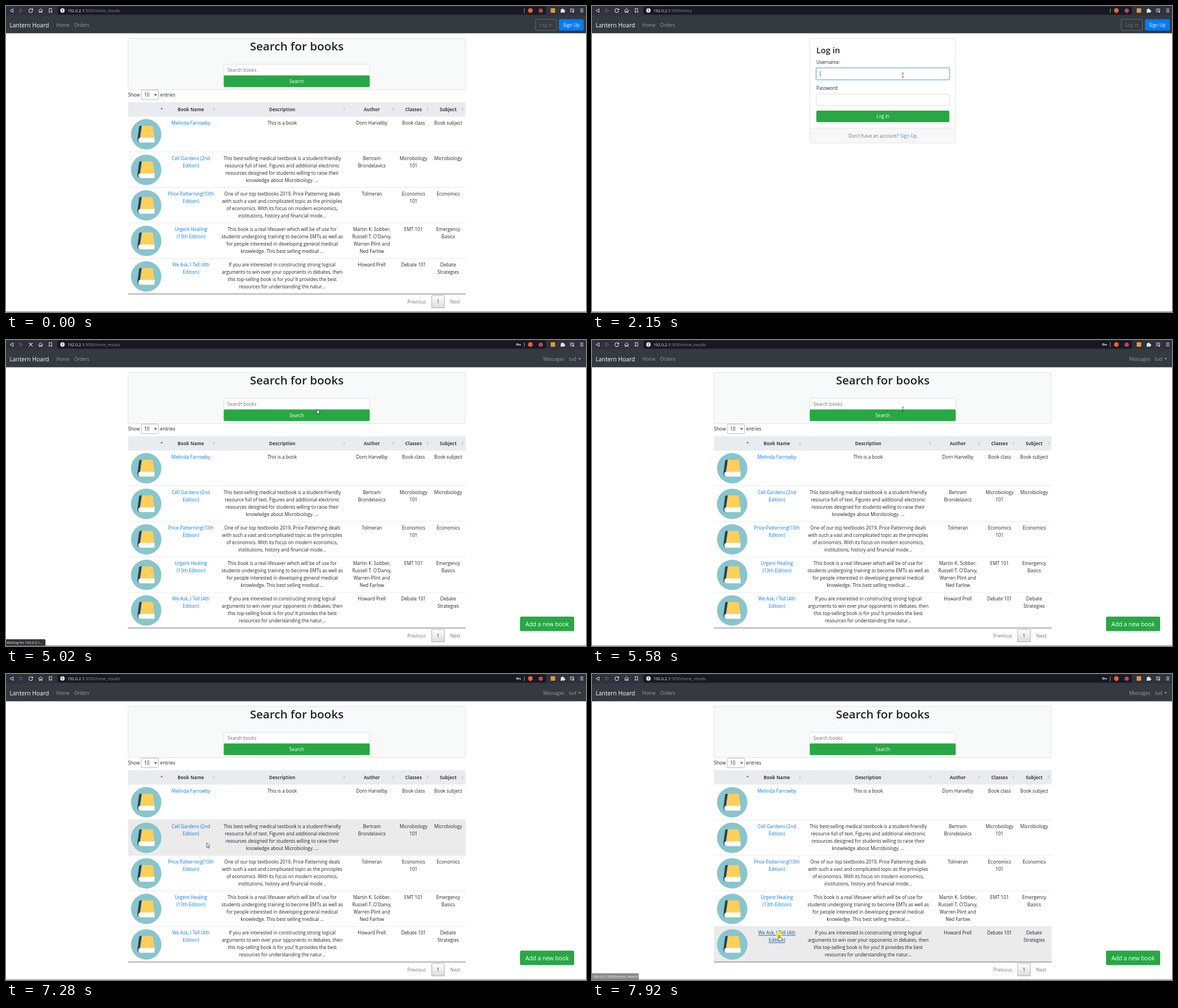
These frames come from a looping animation (1029 px wide and 544 px high, 8000 ms). An HTML page:

```html
<!DOCTYPE html>
<html lang="en">
<head>
<meta charset="utf-8">
<title>Book search</title>
<style>
html, body { margin: 0; width: 100%; height: 100%; overflow: hidden; background: #fff; }
svg { display: block; width: 100vw; height: 100vh; font-family: "Open Sans", "Noto Sans", sans-serif; }
.row .bg { fill: none; }
.row.hot .bg { fill: #ebebeb; }
.row.link .name { fill: #0056b3; text-decoration: underline; }
</style>
</head>
<body>
<svg id="stage" viewBox="0 0 1029 544" preserveAspectRatio="none"></svg>
<script>
const INK = '#212529', GRAY = '#6c757d', BLUE = '#007bff', GREEN = '#28a745', LINE = '#dee2e6';
const HOST = '192.0.2.1', PORT = ':5050';
const LOOP = 8000;
const ROW_TOP = 196, ROW_H = 63.2;

const text = (x, y, s, fill = INK, size = 8.25, anchor = 'middle', more = '') =>
  `<text x="${x}" y="${y}" fill="${fill}" font-size="${size}" text-anchor="${anchor}" ${more}>${s}</text>`;
const left = (x, y, s, fill, size, more) => text(x, y, s, fill, size, 'start', more);
const box = (x, y, w, h, fill, stroke = 'none', r = 2, more = '') =>
  `<rect x="${x}" y="${y}" width="${w}" height="${h}" rx="${r}" fill="${fill}" stroke="${stroke}" ${more}/>`;
const path = (d, fill = 'none', stroke = 'none', w = 1, more = '') =>
  `<path d="${d}" fill="${fill}" stroke="${stroke}" stroke-width="${w}" ${more}/>`;
const group = (id, body) => `<g id="${id}">${body}</g>`;

const books = [
  { name: ['Melinda Farrowby'], about: ['This is a book'],
    author: ['Dorn Harvelby'], level: ['Book class'], subject: ['Book subject'] },
  { name: ['Cell Gardens (2nd', 'Edition)'],
    about: ['This best-selling medical textbook is a student-friendly', 'resource full of text. Figures and additional electronic',
      'resources designed for students willing to raise their', 'knowledge about Microbiology. ...'],
    author: ['Bertram', 'Brondelavics'], level: ['Microbiology', '101'], subject: ['Microbiology'] },
  { name: ['Price Patterning(10th', 'Edition)'],
    about: ['One of our top textbooks 2019, Price Patterning deals', 'with such a vast and complicated topic as the principles',
      'of economics. With its focus on modern economics,', 'institutions, history and financial mode...'],
    author: ['Tolmeran'], level: ['Economics', '101'], subject: ['Economics'] },
  { name: ['Urgent Healing', '(13th Edition)'],
    about: ['This book is a real lifesaver which will be of use for', 'students undergoing training to become EMTs as well as',
      'for people interested in developing general medical', 'knowledge. This best selling medical ...'],
    author: ['Martin K. Sobber,', "Russell T. O'Darvy,", 'Warren Plint and', 'Ned Farlow'],
    level: ['EMT 101'], subject: ['Emergency', 'Basics'] },
  { name: ['We Ask, I Tell (4th', 'Edition)'],
    about: ['If you are interested in constructing strong logical', 'arguments to win over your opponents in debates, then',
      'this top-selling book is for you! It provides the best', 'resources for understanding the natur...'],
    author: ['Howard Prell'], level: ['Debate 101'], subject: ['Debate', 'Strategies'] }
];
const columns = [['name', 'Book Name', 328], ['about', 'Description', 490], ['author', 'Author', 649],
  ['level', 'Classes', 723], ['subject', 'Subject', 784.5]];

const bookIcon = y => `<g transform="translate(248.7 ${y})"><circle r="27" fill="#88c5cd"/>` +
  path('M-7-15H-10Q-12.3-15-12.6-13L-15.5 9Q-15.8 14.5-11 14.5L-7 7Z', '#2b4056') +
  path('M-7.8-15H10Q11.5-15 12-13L14.8 7H-11Z', '#fecf5b') +
  path('M14.8 6.3H-10.5Q-14 6.8-14 10.6T-10.5 14.8H14.8Z', '#fff') + '</g>';

const row = (b, i) => {
  const y = ROW_TOP + i * ROW_H;
  const cells = columns.map(([key, , x]) => b[key].map((s, n) => key === 'name'
    ? text(x, y + 14.6 + n * 13, s, BLUE, 8.25, 'middle', 'class="name"')
    : text(x, y + 14.6 + n * 13, s)).join('')).join('');
  return '<g class="row">' + box(216.5, y, 599, ROW_H, 'none', 'none', 0, 'class="bg"') +
    path(`M216.5 ${y}H815.5`, 'none', LINE, .7) + bookIcon(y + 32) + cells + '</g>';
};

const sorter = x => path(`M${x - 2} 182.8l2-2.6 2 2.6zM${x - 2} 184.2l2 2.6 2-2.6z`, '#c8cbd0');

const listing = box(216.5, 57.5, 598.5, 91, '#f8f9f9', '#dcdddd', 2, 'stroke-width=".8"') +
  text(515.8, 79.3, 'Search for books', INK, 20.6, 'middle', 'font-weight="600"') +
  box(386.5, 103.5, 258.5, 20.5, '#fff', '#ced4da', 2, 'stroke-width=".7"') + left(393, 117, 'Search books', GRAY) +
  box(386.3, 123.6, 259, 20.4, GREEN) + text(515.8, 137, 'Search', '#fff') +
  left(216.5, 161.3, 'Show') + box(240, 149.5, 30.5, 17, '#fff', '#aaa', 2, 'stroke-width=".8"') +
  left(245, 161.3, '10') + path('M263.2 156.7l2.1 2.2 2.1-2.2', 'none', INK, 1.1) + left(273.5, 161.3, 'entries') +
  box(216.5, 171, 599, 25, '#e9ecef', 'none', 0) +
  columns.map(c => text(c[2], 187, c[1], '#3b4148', 8.1, 'middle', 'font-weight="700"')).join('') +
  path('M273.8 183.6l2.3-3.2 2.3 3.2z', '#6a6fd0') + [369, 600, 687, 748, 810].map(sorter).join('') +
  books.map(row).join('') + path('M216.5 512H815.5', 'none', '#555', .9) +
  text(728.5, 529, 'Previous', '#777') + box(755.3, 514.7, 22.5, 22, 'url(#key)', '#979797', 1, 'stroke-width=".8"') +
  text(766.5, 529, '1', '#333') + text(797, 529, 'Next', '#777');

const field = y => box(398, y, 236, 20.5, '#fff', '#ced4da', 2, 'stroke-width=".8"');
const ring = (id, y) => group(id, box(397.2, y - .8, 237.6, 22.1, 'none', '#007bff', 3, 'stroke-opacity=".25" stroke-width="1.8"') +
  box(398, y, 236, 20.5, 'none', '#80bdff', 2, 'stroke-width=".8"'));

const login = box(386.5, 57.5, 258.5, 186, '#fff', '#dcdddd', 2, 'stroke-width=".8"') +
  box(387, 217, 257.5, 26, '#f7f7f7', 'none', 1) + path('M387 217H645', 'none', '#dcdddd', .8) +
  left(398, 83.6, 'Log in', INK, 14.6, 'font-weight="600"') +
  left(398, 102.7, 'Username:') + field(110.3) + ring('userRing', 110.3) +
  left(398, 149, 'Password:') + field(156.6) + ring('passRing', 156.6) +
  left(404.5, 124, '', '#495057', 8.25, 'id="user"') + group('dots', '') +
  path('M0 0v10', 'none', '#222', .7, 'id="caret"') +
  box(398, 186, 236, 20.5, GREEN) + text(516, 199.3, 'Log in', '#fff') +
  left(455, 233.7, "Don't have an account?", GRAY) + left(547, 233.7, 'Sign Up', '#3490dc');

const toolbar = box(0, 0, 1029, 17, '#2f313c', 'none', 0) + box(91, .8, 867, 14.4, '#171922', 'none', 2.5) +
  path('M12.6 5v6.4l-5.4-3.2z', 'none', '#dfe0e4', 1) + path('M24.4 5v6.4l5.4-3.2z', 'none', '#686b76', 1) +
  group('reload', path('M46.8 6.2A3.4 3.4 0 1 0 47.3 9', 'none', '#e4e5e8', 1.1) + path('M48 4v3.4h-3.4z', '#e4e5e8')) +
  path('M41 5l6 6.2M47 5l-6 6.2', 'none', '#e4e5e8', 1.1, 'id="stop"') +
  path('M57.5 8.2l3.9-3.6 3.9 3.6M58.8 7.7v3.8h1.8V9.2h1.6v2.3h1.8V7.7', 'none', '#e4e5e8', 1) +
  path('M76.7 4.6h4.4v7l-2.2-2-2.2 2z', 'none', '#e4e5e8', 1) +
  '<circle cx="100.2" cy="8" r="3.9" fill="#e8e9ec"/>' + path('M100.2 5.6v3M100.2 9.4v1.1', 'none', '#171922', 1) +
  `<text x="109" y="10.7" font-size="7.1" fill="#f2f3f5">${HOST}<tspan id="route" fill="#8d9099"></tspan></text>` +
  group('keyIcon', '<circle cx="907.2" cy="8" r="1.5" fill="none" stroke="#dfe0e4" stroke-width="1.1"/>' + path('M908.8 8h4v1.7M911 8v1.5', 'none', '#dfe0e4', 1.1)) +
  path('M919.5 4v8.5', 'none', '#b4b6bc', .8) +
  '<circle cx="930.3" cy="8" r="4.2" fill="#f0602f"/><circle cx="948.7" cy="8.2" r="3.8" fill="#c5405f"/>' +
  box(966.3, 4, 8, 8, '#d99a3c', 'none', 1) +
  path('M984 6h2.2a1.3 1.3 0 1 1 2.4 0h2v2.2a1.2 1.2 0 1 1 0 2.2V12h-2.2a1.2 1.2 0 0 0-2.2 0H984V9.8a1.2 1.2 0 0 0 0-2z', '#e4e5e8') +
  path('M1000.5 5.3h7M1000.5 7.8h4.5M1000.5 10.3h3M1007 5.3v5.2', 'none', '#e4e5e8', 1) + '<circle cx="1006" cy="10.4" r="1.4" fill="#e4e5e8"/>' +
  path('M1018.7 5.4h5.6M1018.7 8h5.6M1018.7 10.6h5.6', 'none', '#e4e5e8', 1);

const navbar = box(0, 16.5, 1029, 32, '#343a40', 'none', 0) +
  left(6.5, 37.6, 'Lantern Hoard', '#fff', 10.3) + left(89.3, 36.8, 'Home', '#9a9da0') + left(121, 36.8, 'Orders', '#9a9da0') +
  group('guest', box(939, 23.7, 37.5, 19.7, GRAY, GRAY, 2, 'id="logBtn" stroke-width=".8"') +
    text(957.8, 36.8, 'Log In', GRAY, 8.25, 'middle', 'id="logText"') +
    box(981, 23.4, 44, 20.3, BLUE) + text(1003, 36.8, 'Sign Up', '#fff')) +
  group('member', left(953, 36.8, 'Messages', '#9a9da0') + left(998.8, 36.8, 'tud', '#9a9da0') + path('M1015.2 32.2h5.2l-2.6 2.7z', '#9a9da0'));

const pointers = group('pointer',
  group('glow', '<circle cx="0" cy="-1" r="5.5" fill="#f7e52b" opacity=".85"/>') +
  path('M0 0v8.6l2-1.8 1.4 3 1.3-.6-1.3-2.9h2.7z', '#fff', '#222', .7, 'id="arrow"') +
  path('M-.8 .7Q0-.5.8.7V4l3.9.9Q5.5 5.2 5.3 6.2L4.6 9.7H.3L-2.4 6.2Q-2.5 4.9-.8 5.6Z', '#fff', '#222', .7, 'id="hand"') +
  path('M-2-4.2Q0-4.2 0-3.2Q0-4.2 2-4.2M0-3.2V3.2M-2 4.2Q0 4.2 0 3.2Q0 4.2 2 4.2', 'none', '#444', .8, 'id="beam"'));

document.getElementById('stage').innerHTML =
  '<defs><linearGradient id="key" x2="0" y2="1"><stop stop-color="#fff"/><stop offset="1" stop-color="#dcdcdc"/></linearGradient></defs>' +
  box(0, 0, 1029, 544, '#fff', 'none', 0) + toolbar + navbar + group('listing', listing) + group('login', login) +
  group('addBook', box(912, 491.8, 96, 25.8, GREEN, 'none', 2.6) + text(960, 508.7, 'Add a new book', '#fff', 10.3)) +
  group('status', box(-2, 532, 0, 14, '#35363a', 'none', 2, 'id="statusBox"') + left(1, 540.3, '', '#f1f1f1', 6.15, 'id="statusText"')) +
  box(0, 543.2, 1029, .8, '#666a70', 'none', 0) + pointers;

const $ = id => document.getElementById(id);
const rows = [...document.querySelectorAll('.row')];
const show = (id, on) => $(id).setAttribute('visibility', on ? 'visible' : 'hidden');
const fade = (id, v) => $(id).setAttribute('opacity', v);
const within = (t, a, b) => t >= a && t < b;
const ramp = (t, a, d = 150) => Math.min(1, Math.max(0, (t - a) / d));
const count = (times, t) => times.filter(k => k <= t).length;

// pointer stops: time, x, y
const stops = [[70, 921, 500], [780, 939.5, 38], [1200, 939.5, 38], [1680, 553, 121], [1760, 553, 121], [1850, 551.5, 123],
  [6090, 551.5, 123], [6490, 362.5, 280], [6620, 362.5, 280], [6810, 357, 299], [7100, 357, 299], [7200, 356, 300],
  [7300, 356, 300], [7800, 332, 464.5], [LOOP, 332, 464.5]];
const userKeys = [2620, 2770, 2860];
const passKeys = [3260, 3410, 3490, 3640, 3720, 3870, 4030, 4180, 4260, 4340, 4470, 4490];
const edits = [1130, ...userKeys, 3010, ...passKeys];
const LOGIN_AT = 1100, TAB_AT = 3010, MEMBER_AT = 5020;

function pointerAt(t) {
  const i = stops.findIndex(s => s[0] > t);
  if (i < 1) return stops[0].slice(1);
  const [t0, x0, y0] = stops[i - 1], [t1, x1, y1] = stops[i];
  const p = (t - t0) / (t1 - t0), e = p * p * (3 - 2 * p);
  return [x0 + (x1 - x0) * e, y0 + (y1 - y0) * e];
}

function setStatus(t) {
  let s, w, v;
  if (t < 2000) [s, w, v] = [HOST + PORT + '/entry', 62, ramp(t, 890, 60) * (1 - ramp(t, 1450, 100))];
  else if (t < 6000) [s, w, v] = ['Waiting for ' + HOST + '...', 70, t < MEMBER_AT ? 0 : 1 - ramp(t, 5400, 160)];
  else [s, w, v] = [HOST + PORT + '/tome_view/4', 83, ramp(t, 7870, 90)];
  $('statusText').textContent = s;
  $('statusBox').setAttribute('width', w + 2);
  fade('status', v);
}

function setForm(t) {
  fade('userRing', ramp(t, LOGIN_AT) * (1 - ramp(t, TAB_AT)));
  fade('passRing', ramp(t, TAB_AT));
  const user = $('user'), typed = 'tud'.slice(0, count(userKeys, t)), dots = count(passKeys, t);
  user.textContent = typed;
  $('dots').innerHTML = Array.from({ length: dots }, (_, i) =>
    `<circle cx="${406.3 + i * 3.62}" cy="167.4" r="1.15" fill="#343a40"/>`).join('');
  const pass = t >= TAB_AT;
  const x = 404.8 + (pass ? dots * 3.62 : typed ? user.getComputedTextLength() : 0);
  $('caret').setAttribute('transform', `translate(${x} ${pass ? 162 : 115.7})`);
  const last = edits.filter(k => k <= t).pop() || 0;
  show('caret', within(t, LOGIN_AT, MEMBER_AT) && (t - last) % 1000 < 500);
}

function setPointer(t, onLogin, member) {
  const [x, y] = pointerAt(t);
  let kind = 'arrow';
  const r = Math.floor((y - ROW_TOP) / ROW_H), dy = y - ROW_TOP - r * ROW_H;
  const hot = !onLogin && x > 216 && x < 815 && r >= 0 && r < 5;
  const link = hot && (within(dy, 6, 19) ? Math.abs(x - 328) < 37 : r > 0 && within(dy, 19, 32) && Math.abs(x - 328) < 15);
  rows.forEach((el, i) => {
    el.classList.toggle('hot', hot && i === r);
    el.classList.toggle('link', link && i === r);
  });
  const onLog = !member && x >= 938 && x < 977 && y < 44;
  const onSearch = !onLogin && within(x, 386, 645) && within(y, 124, 144);
  const onField = onLogin ? within(x, 398, 634) && within(y, 110, 131) : within(x, 386, 645) && within(y, 103, 124);
  if (link || onLog || onSearch) kind = 'hand';
  else if (onField && !within(t, 4700, 5100)) kind = 'beam';
  for (const k of ['arrow', 'hand', 'beam']) show(k, t >= 70 && k === kind);
  show('glow', within(t, 900, 1030) || t >= 7880);
  $('pointer').setAttribute('transform', `translate(${x} ${y})`);
}

function draw(t) {
  const onLogin = within(t, LOGIN_AT, MEMBER_AT), member = t >= MEMBER_AT;
  const loading = within(t, 920, LOGIN_AT) || within(t, 4700, 5190);
  show('listing', !onLogin);
  show('login', onLogin);
  show('guest', !member);
  show('member', member);
  show('addBook', member);
  show('keyIcon', t >= TAB_AT);
  show('reload', !loading);
  show('stop', loading);
  $('route').textContent = PORT + (onLogin ? '/entry' : '/tome_results');
  const hover = onLogin ? ramp(t, LOGIN_AT) * (1 - ramp(t, 1270)) : ramp(t, 740);
  $('logBtn').setAttribute('fill-opacity', hover);
  $('logText').setAttribute('fill', `rgb(${[108, 117, 125].map(c => Math.round(c + (255 - c) * hover))})`);
  setForm(t);
  setStatus(t);
  setPointer(t, onLogin, member);
}

const start = performance.now();
function tick(now) {
  draw(Math.max(0, now - start) % LOOP);
  requestAnimationFrame(tick);
}
draw(0);
requestAnimationFrame(tick);
</script>
</body>
</html>
```
